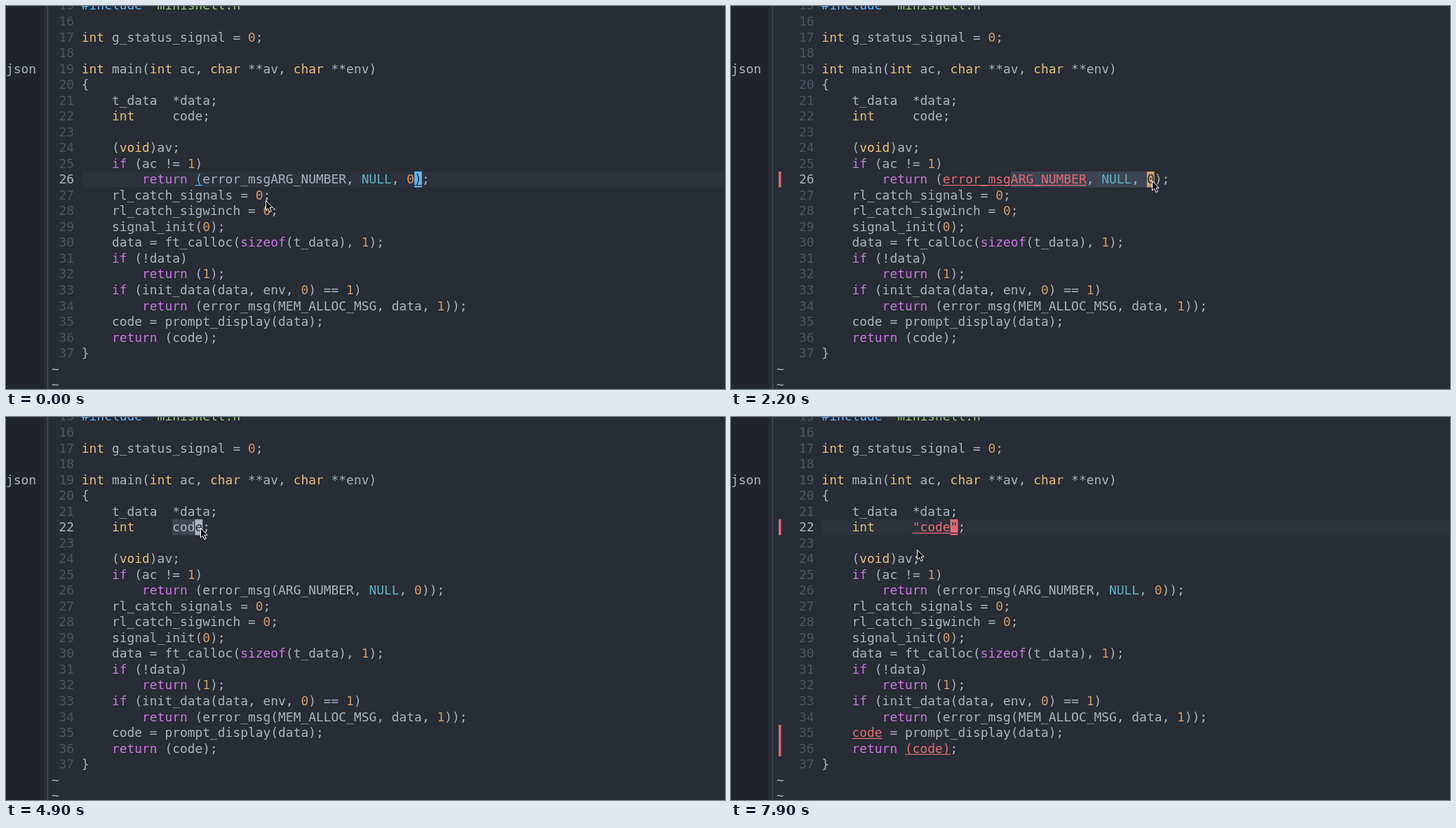
Recreate the animation shown at these times as an HTML page with a canvas. Size 1025 by 546 pixels, loop 8 s.

```html
<!DOCTYPE html>
<html lang="en">
<head>
<meta charset="utf-8">
<title>Editor</title>
<style>
  html, body { margin: 0; width: 100%; height: 100%; overflow: hidden; background: #282c34; }
  canvas { display: block; }
</style>
</head>
<body>
<canvas id="stage" width="1025" height="546"></canvas>
<script>
const ctx = document.getElementById('stage').getContext('2d');
const LOOP = 8000, CELL = 10.78, ROW = 22.53, FIRST = 15;
const BG = '#282c34', SIDE = '#21252b', FG = '#abb2bf', DIM = '#4b5263', BAND = '#2c313c',
  SELECT = '#3e4452', RED = '#e06c75', BLUE = '#61afef', GREEN = '#98c379',
  YELLOW = '#e5c07b', PURPLE = '#c678dd', ORANGE = '#d19a66', CYAN = '#56b6c2';
const FONT = '17.9px "DejaVu Sans Mono", monospace';

const CODE = `#include "minishell.h"

int g_status_signal = 0;

int main(int ac, char **av, char **env)
{
    t_data  *data;
    int     code;

    (void)av;
    if (ac != 1)
        return (error_msgARG_NUMBER, NULL, 0);
    rl_catch_signals = 0;
    rl_catch_sigwinch = 0;
    signal_init(0);
    data = ft_calloc(sizeof(t_data), 1);
    if (!data)
        return (1);
    if (init_data(data, env, 0) == 1)
        return (error_msg(MEM_ALLOC_MSG, data, 1));
    code = prompt_display(data);
    return (code);
}`.split('\n');

const SYNTAX = [
  [/#include/g, BLUE],
  [/\b(int|char|void)\b/g, YELLOW],
  [/\b(return|if|sizeof)\b/g, PURPLE],
  [/\b\d+\b/g, ORANGE],
  [/\bNULL\b/g, CYAN],
  [/"[^"]*"/g, GREEN],
];

// Straight pointer moves: start, end, x and y reached
const MOVES = [
  [0, 300, 360, 254], [500, 800, 387, 247], [800, 1600, 600, 249], [2800, 3000, 542, 241],
  [3900, 4000, 467, 219], [4000, 4500, 262, 156], [4500, 4900, 277, 158],
  [5800, 6000, 352, 218], [6800, 7200, 256, 168], [7200, 7600, 265, 189],
];
const ARROW = new Path2D('M0 0V13.5L3.1 10.8L5.4 16L7.8 15L5.5 9.8H9.6Z');

const clamp = (v, lo, hi) => Math.min(hi, Math.max(lo, v));
const rowTop = line => 10.7 + (line - 16) * ROW;

function pointerAt(t) {
  let x = 370, y = 277;
  for (const [start, end, toX, toY] of MOVES) {
    const f = clamp((t - start) / (end - start), 0, 1);
    x += (toX - x) * f;
    y += (toY - y) * f;
  }
  return [Math.round(x), Math.round(y)];
}

// Cursor line and column, start of the selection, matching bracket, red ranges
function editorAt(t, mouseX) {
  const signs = (t >= 700 && t < 4900) || t >= 7700;
  const gutter = signs ? 12 : 10;
  const under = Math.floor(mouseX / CELL) - gutter;
  const state = { gutter, errors: [], line: t < 4500 ? 26 : 22, col: 17, from: -1, match: -1 };
  if (t < 700) Object.assign(state, { col: 44, match: 15 });
  else if (t < 900) state.col = 25;
  else if (t < 2900) Object.assign(state, { col: clamp(under, 25, 43), from: 25 });
  else if (t < 4500) Object.assign(state, { col: 45, match: 25 });
  else if (t < 5900) Object.assign(state, { col: clamp(under, 12, 15), from: 12 });

  if (t >= 7700) state.errors = [[22, 12, 6], [35, 4, 4], [36, 11, 6]];
  else if (signs) state.errors = [[26, 16, t < 2900 ? 19 : 20]];

  state.code = CODE.map(s => {
    if (t >= 2900) s = s.replace('msgARG_NUMBER, NULL, 0', 'msg(ARG_NUMBER, NULL, 0)');
    return t >= 5900 ? s.replace('     code', '     "code"') : s;
  });
  return state;
}

function colours(text) {
  const out = Array(text.length).fill(FG);
  for (const [pattern, colour] of SYNTAX)
    for (const m of text.matchAll(pattern)) out.fill(colour, m.index, m.index + m[0].length);
  return out;
}

function box(x, y, w, h, colour) {
  ctx.fillStyle = colour;
  ctx.fillRect(x, y, w, h);
}

function glyph(ch, col, line, colour) {
  ctx.fillStyle = colour;
  ctx.fillText(ch, col * CELL, rowTop(line) + 17.3);
}

function write(text, col, line, colour) {
  [...text].forEach((ch, i) => glyph(ch, col + i, line, colour));
}

function drawLine(text, line, s) {
  const y = rowTop(line), current = line === s.line;
  if (current && s.from < 0) box(s.gutter * CELL, y, 1025, ROW, BAND);
  write(String(line), s.gutter - 3, line, current ? FG : DIM);

  const ink = colours(text), lined = new Set();
  for (const [row, start, count] of s.errors) {
    if (row !== line) continue;
    box(68, y, 3.4, ROW, RED);
    ink.fill(RED, start, start + count);
    for (let i = start; i < start + count; i++) lined.add(i);
  }
  if (current && s.match >= 0)
    for (const i of [s.match, s.col]) {
      ink[i] = BLUE;
      lined.add(i);
    }

  [...text].forEach((ch, i) => {
    const col = s.gutter + i, x = col * CELL;
    const block = current && i === s.col;
    if (block) box(x, y, CELL, ROW, ink[i]);
    else if (current && s.from >= 0 && i >= s.from && i < s.col) box(x, y, CELL + 0.3, ROW, SELECT);
    const colour = block ? BG : ink[i];
    if (lined.has(i)) box(x, y + 19, CELL, 1.2, colour);
    glyph(ch, col, line, colour);
  });
}

function drawPointer(x, y) {
  ctx.save();
  ctx.translate(x + 0.5, y + 0.5);
  ctx.fillStyle = '#000';
  ctx.strokeStyle = '#fff';
  ctx.fill(ARROW);
  ctx.stroke(ARROW);
  ctx.restore();
}

function draw(now) {
  const t = Math.floor(now % LOOP / 100) * 100;
  const [x, y] = pointerAt(t);
  const state = editorAt(t, x);

  box(0, 0, 1025, 546, BG);
  box(0, 0, 5 * CELL, 546, SIDE);
  box(58.3, 0, 2, 546, SELECT);
  ctx.font = FONT;
  write('json', 0, 19, FG);
  state.code.forEach((text, i) => drawLine(text, FIRST + i, state));
  for (const line of [38, 39]) glyph('~', 6, line, FG);
  drawPointer(x, y);
}

const begin = performance.now();
function tick() {
  draw(performance.now() - begin);
  requestAnimationFrame(tick);
}
tick();
</script>
</body>
</html>
```
